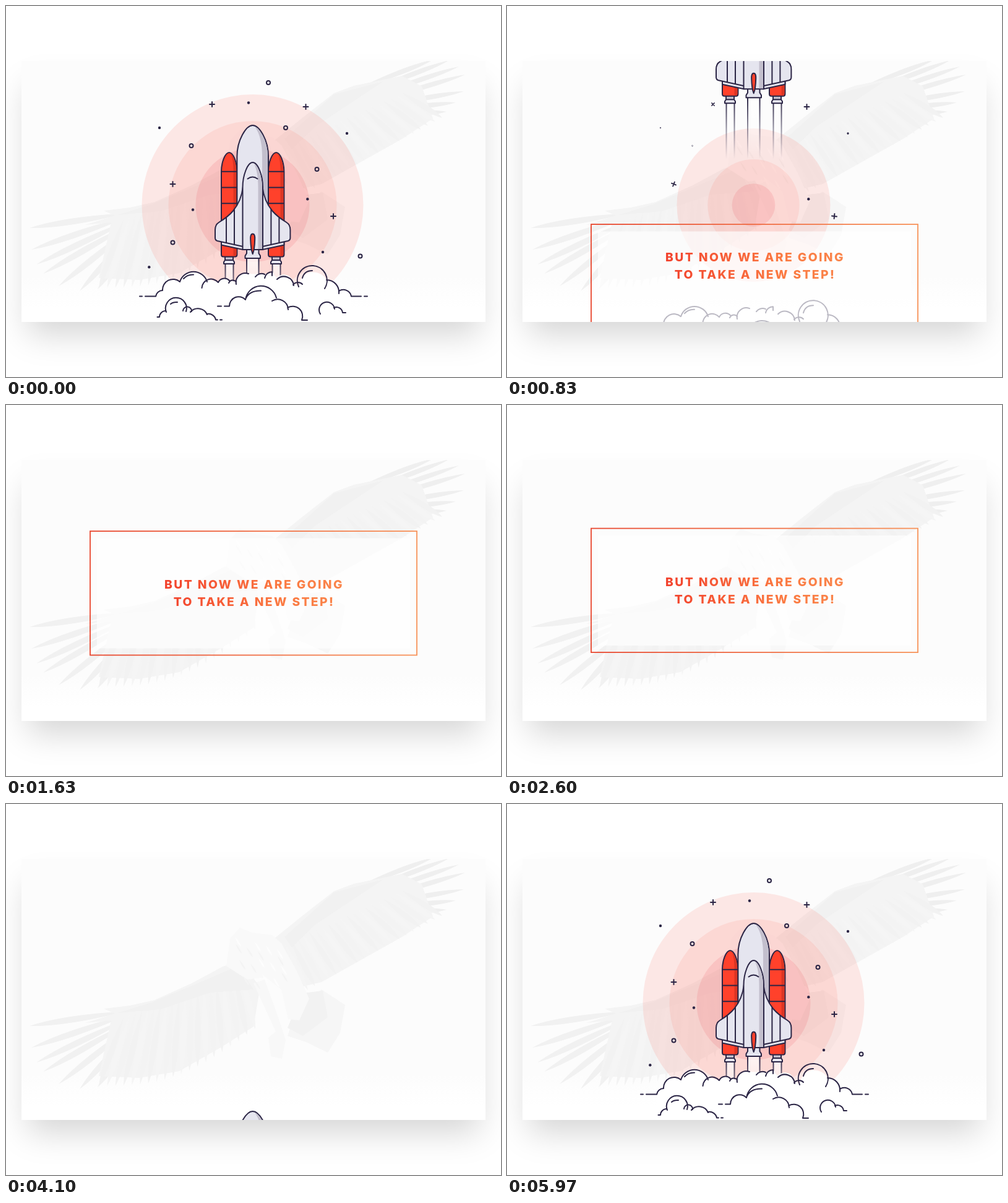
These frames come from a looping animation (800 px wide and 600 px high, 6010 ms). An HTML page:

```html
<!DOCTYPE html>
<html lang="en">
<head>
<meta charset="utf-8">
<title>Rocket launch</title>
<style>
  html, body { margin: 0; width: 100%; height: 100%; overflow: hidden; background: #fff; }
  .card { position: absolute; left: 25px; top: 89px; width: 750px; height: 422px;
    box-shadow: 0 30px 50px -10px rgba(0,0,0,.17); }
  svg { position: absolute; left: 0; top: 0; display: block; }
  .ink { stroke: #2b2545; stroke-width: 2; stroke-linejoin: round; stroke-linecap: round; }
  .line { fill: none; }
  .metal { fill: #e5e5ef; }
  .shade { fill: #c3bfcd; }
  .red { fill: #ff412b; }
  .title { font: 800 19.3px Inter, "Open Sans", sans-serif; letter-spacing: 2.4px; text-anchor: middle; }
</style>
</head>
<body>
<div class="card"></div>
<svg width="800" height="600" viewBox="0 0 800 600">
  <defs>
    <clipPath id="cardClip"><rect x="25" y="89" width="750" height="422"/></clipPath>
    <linearGradient id="cardFill" x2="0" y2="1">
      <stop offset=".82" stop-color="#fcfcfc"/><stop offset=".95" stop-color="#fff"/>
    </linearGradient>
    <linearGradient id="frameInk">
      <stop stop-color="#e8472f"/><stop offset="1" stop-color="#f7935a"/>
    </linearGradient>
    <linearGradient id="textInk" gradientUnits="userSpaceOnUse" x1="252" x2="548" y1="0" y2="0">
      <stop stop-color="#f2402c"/><stop offset=".65" stop-color="#fb7a42"/><stop offset="1" stop-color="#fa864c"/>
    </linearGradient>
    <linearGradient id="flameInk" gradientUnits="userSpaceOnUse" x1="0" x2="0" y1="408" y2="507">
      <stop stop-color="#2b2545"/><stop offset="1" stop-color="#2b2545" stop-opacity="0"/>
    </linearGradient>
    <linearGradient id="flameFill" gradientUnits="userSpaceOnUse" x1="0" x2="0" y1="408" y2="507">
      <stop stop-color="#fff" stop-opacity=".75"/><stop offset="1" stop-color="#fff" stop-opacity="0"/>
    </linearGradient>

    <g id="booster" class="ink">
      <path class="shade" d="M354 404h13v8h-13Z"/>
      <path class="metal" d="M354 411H367L369 414V417H352V414Z"/>
      <path class="red" d="M348 268C348 253 354 237 360.7 237S373.400 253 373.400 268V402Q373.400 405.500 370 405.500H351.500Q348 405.500 348 402Z"/>
      <path fill="#dc3523" stroke="none" d="M363 239C367 247 367.500 257 367.500 268V404.500H370Q372.400 404.500 372.400 402V268C372.400 255 368 242 363 239Z"/>
      <path class="line" d="M348 267.700H373M348 293.500H373M348 319.300H373"/>
    </g>
    <g id="wing" class="ink">
      <path class="metal" d="M348 380V386.500L383 394V380Z"/>
      <path class="metal" d="M383 292C379 328 357 342 344 350C339 353 338 357 338 362V375Q338 379 342 380L383 389Z"/>
      <path class="line" d="M356 343V382.500M369 329V385.500"/>
    </g>
  </defs>

  <g clip-path="url(#cardClip)">
    <rect x="25" y="89" width="750" height="422" fill="url(#cardFill)"/>
    <g id="eagle"></g>
    <g id="halos"></g>
    <g id="stars"></g>

    <g id="rocket">
      <g fill="url(#flameFill)">
        <path d="M354.500 417h13v90h-13ZM430.500 417h13v90h-13ZM389 408h19.500v99H389Z"/>
      </g>
      <g fill="url(#flameInk)">
        <path d="M353.500 417h2v90h-2ZM366.500 417h2v90h-2ZM429.500 417h2v90h-2ZM442.500 417h2v90h-2ZM388 408h2v99h-2ZM407.500 408h2v99h-2Z"/>
      </g>
      <use href="#booster"/>
      <use href="#booster" x="76"/>
      <g class="ink">
        <path class="metal" d="M373.400 340V243C373.400 217 388 193 398.700 193S424 217 424 243V340Z"/>
        <path class="shade" stroke="none" d="M402 195C411 207 414 225 414 243V340H423V243C423 219 411 199 402 195Z"/>
        <path class="metal" d="M389 392H408.500V400L411 404V408H386.500V404L389 400Z"/>
      </g>
      <use href="#wing"/>
      <use href="#wing" transform="matrix(-1 0 0 1 797.400 0)"/>
      <g class="ink">
        <path class="metal" d="M382.500 394V293C382.500 275 390 253 398.700 253S415 275 415 293V394Z"/>
        <path class="shade" stroke="none" d="M401 255C406 266 407.500 280 407.500 293V393H414V293C414 277 408 259 401 255Z"/>
        <path class="line" d="M390.500 279.500Q398.500 273.500 406.500 279.500"/>
        <path class="red" d="M398.700 368.500C395.500 368.500 395 373 395.200 377C395.500 388 397 397 398.700 401C400.400 397 401.900 388 402.200 377C402.400 373 401.900 368.500 398.700 368.500Z"/>
      </g>
    </g>

    <g id="clouds">
      <path fill="#fff" d="M242 469A11 11 0 0 1 253 460A17 17 0 0 1 281 446A23 23 0 0 1 323 441L343 447A11 11 0 0 1 361 444L372 446A15 15 0 0 1 392 433L418 434L431 431L437 440A16 16 0 0 1 465 449L473 453A24 24 0 0 1 518 443A20 20 0 0 1 538 462A13 13 0 0 1 558 469V530H242Z"/>
      <g class="ink line">
        <path d="M216 469.500H220M225 469.500H242A11 11 0 0 1 253 460A17 17 0 0 1 281 446A23 23 0 0 1 325 446M287 441Q293 434 303 434.500
          M316.500 456A15 15 0 0 1 343 447A11 11 0 0 1 361 444M360 448A7 7 0 0 1 372 446M372 450A15 15 0 0 1 392 433
          M403 438A12 12 0 0 1 418 434M418 440A12 12 0 0 1 430 430V436M438 442A16 16 0 0 1 465 452M464 451A10 10 0 0 1 479 450
          M473 454A24 24 0 1 1 515 457M479 440Q482 428 495 428M518 443A20 20 0 0 1 538 465M538 461A13 13 0 0 1 558 469.500H574M579 469.500H584"/>
        <path d="M342 485.500H348M353 485.500H361A15 15 0 0 1 387 475A25.500 25.500 0 0 1 437 472M387 474Q393 460 412 460.500
          M430 477A17 17 0 0 1 456 491M455 488A16 16 0 0 1 478 508H487"/>
        <path d="M244.500 503H248A10 10 0 0 1 258 493M259 495A17 17 0 1 1 291 494M266 482Q270 478.500 277 479M286 493A7 7 0 0 1 300 494
          M298 495A16 16 0 0 1 325 499M325 498A12 12 0 0 1 339 507.500H342M346 507.500H349"/>
        <path d="M508 498A12.500 12.500 0 1 1 531 490M530 488A10 10 0 0 1 544 496H549"/>
      </g>
    </g>

    <g id="panel">
      <rect x="147" y="212" width="506" height="178" fill="#fff" opacity=".68"/>
      <rect x="136" y="200.500" width="528" height="200.500" fill="none" stroke="url(#frameInk)" stroke-width="1.8"/>
    </g>
    <g id="title" class="title" fill="url(#textInk)">
      <text x="401" y="293.500">BUT NOW WE ARE GOING</text>
      <text x="401" y="321.500">TO TAKE A NEW STEP!</text>
    </g>
  </g>
</svg>

<script>
const LOOP = 6010;
const byId = id => document.getElementById(id);
const clamp = v => Math.max(0, Math.min(1, v));
const mix = (a, b, u) => a + (b - a) * u;

function add(parent, tag, attrs) {
  const el = document.createElementNS('http://www.w3.org/2000/svg', tag);
  for (const key in attrs) el.setAttribute(key, attrs[key]);
  parent.appendChild(el);
  return el;
}

// Pale bird in the background
const eagle = byId('eagle');
const shape = (d, fill) => add(eagle, 'path', { d, fill });

function feather(x1, y1, x2, y2, width, fill) {
  const len = Math.hypot(x2 - x1, y2 - y1);
  const nx = -(y2 - y1) / len * width, ny = (x2 - x1) / len * width;
  const cx = mix(x1, x2, .65), cy = mix(y1, y2, .65);
  shape(`M${x1} ${y1}Q${cx + nx} ${cy + ny} ${x2} ${y2}Q${cx - nx} ${cy - ny} ${x1} ${y1}Z`, fill);
}

function drawEagle() {
  const rightTips = [[690, 87], [716, 88], [732, 98], [742, 111], [740, 138], [727, 156], [712, 171]];
  const leftTips = [[38, 359], [41, 394], [49, 418], [60, 433], [85, 453], [119, 461], [148, 458]];
  rightTips.forEach(([x, y], i) => feather(570 + i * 9, 133 + i * 7, x, y, 8, '#efefef'));
  leftTips.forEach(([x, y], i) => feather(196 + i * 3, 335 + i * 5, x, y, 10, '#f1f1f1'));
  shape('M428 222L480 180L530 141L562 129L640 113L672 130L690 182L640 215L590 243L510 288L480 295L440 270Z', '#f4f4f4');
  shape('M385 252L350 263L300 290L240 317L200 326L158 331L176 339L128 354L170 350L150 440L215 443L280 432L350 392L400 360L410 300Z', '#f4f4f4');
  for (let i = 0; i < 20; i++) {
    const u = i / 19, tone = ['#f2f2f2', '#f5f5f5', '#f3f3f3'][i % 3];
    feather(mix(640, 450, u), mix(140, 225, u), mix(705, 488, u), mix(181, 301, u), 9, tone);
    feather(mix(190, 380, u), mix(345, 275, u), mix(150, 403, u), mix(456, 364, u) + 30 * Math.sin(Math.PI * u), 10, tone);
  }
  shape('M450 215L530 143L610 122L560 155L500 195L462 232Z', '#f1f1f1');
  shape('M375 262L300 294L235 321L180 338L250 332L330 305L400 300Z', '#f1f1f1');
  shape('M470 330L510 300L548 325L540 370L520 402L485 385L455 375Z', '#f6f6f6');
  shape('M478 306L512 302L520 345L480 375L455 362Z', '#f2f2f2');
  shape('M362 218L378 200L398 208L430 212L445 225L470 270L490 315L474 350L456 348L445 300L420 280L390 284L356 262Z', '#f9f9f9');
  shape('M400 290L418 284L440 345L452 382L446 412L428 408L424 378L436 368Z', '#f8f8f8');
  for (let i = 0; i < 18; i++) {
    const x = 370 + (i * 37) % 80, y = 215 + (i * 23) % 72;
    feather(x, y, x + 10, y + 16, 3, i % 2 ? '#f4f4f4' : '#fdfdfd');
  }
}
drawEagle();

// Halos: radius, exit start, entry start, entry length
const halos = [
  [179, 330, 5230, 720, 'rgba(255,70,50,.11)'],
  [136, 180, 5070, 720, 'rgba(255,70,50,.09)'],
  [92, 30, 4770, 600, 'rgba(230,60,70,.13)']
].map(([r, out, enter, span, fill]) =>
  ({ r, out, enter, span, el: add(byId('halos'), 'circle', { cx: 398.5, cy: 322, fill }) }));

// Stars: kind, x, y, exit start, entry start
const stars = [
  ['ring', 424, 124, 100, 4130], ['ring', 452, 197, 250, 4250], ['ring', 299.500, 226, 430, 4400],
  ['ring', 502.500, 264, 150, 4180], ['ring', 269.500, 382.500, 200, 4300], ['ring', 572.500, 404.500, 280, 4150],
  ['plus', 333, 159, 580, 4600], ['plus', 484.500, 163, 850, 4920],
  ['plus', 269.500, 288, 710, 4550], ['plus', 529, 340, 800, 4820],
  ['dot', 392, 156.500, 380, 4820], ['dot', 248, 197, 480, 4350], ['dot', 551, 206, 580, 4450],
  ['dot', 302, 329.500, 300, 4220], ['dot', 487.300, 312.300, 830, 4560], ['dot', 512, 398, 330, 4280],
  ['dot', 231.300, 422.300, 50, 4160]
].map(([kind, x, y, out, enter]) => {
  const layer = byId('stars');
  const el = kind === 'plus'
    ? add(layer, 'path', { class: 'ink', d: 'M-4 0H4M0-4V4' })
    : add(layer, 'circle', kind === 'ring' ? { class: 'ink line', r: 3 } : { fill: '#2b2545', r: 2.2 });
  return { x, y, out, enter, el };
});

const shift = (id, y) => byId(id).setAttribute('transform', `translate(0 ${y})`);

function draw(t) {
  const entering = t > 4000;

  for (const h of halos) {
    const scale = entering
      ? 1 - (1 - clamp((t - h.enter) / h.span)) ** 3
      : 1 - clamp((t - h.out) / 1100) ** 1.5;
    h.el.setAttribute('r', h.r * scale);
  }

  for (const s of stars) {
    const gone = entering ? 1 - clamp((t - s.enter) / 500) : clamp((t - s.out) / 500);
    const scale = 1 - gone * gone;
    s.el.setAttribute('transform', `translate(${s.x} ${s.y}) rotate(${90 * gone}) scale(${scale})`);
    s.el.setAttribute('opacity', Math.min(1, scale * 1.5));
  }

  if (entering) {
    shift('rocket', 322 * (1 - clamp((t - 4070) / 1636)) ** 3);
    shift('clouds', 37 * (Math.max(0, 5970 - t) / 900) ** 3);
  } else {
    const lift = (Math.max(0, t - 30) / 800) ** 2.4;
    shift('rocket', -259 * lift);
    shift('clouds', 56 * lift);
  }

  const arrive = Math.max(0, 1950 - t) / 1120;
  const leave = (Math.max(0, t - 2470) / 700) ** 2.43;
  shift('panel', 153 * arrive ** 3 - 54.5 * leave);
  shift('title', 119.5 * arrive ** 2.82 - 52.5 * leave);
}

const start = performance.now();
function tick() {
  draw((performance.now() - start) % LOOP);
  requestAnimationFrame(tick);
}
tick();
</script>
</body>
</html>
```
